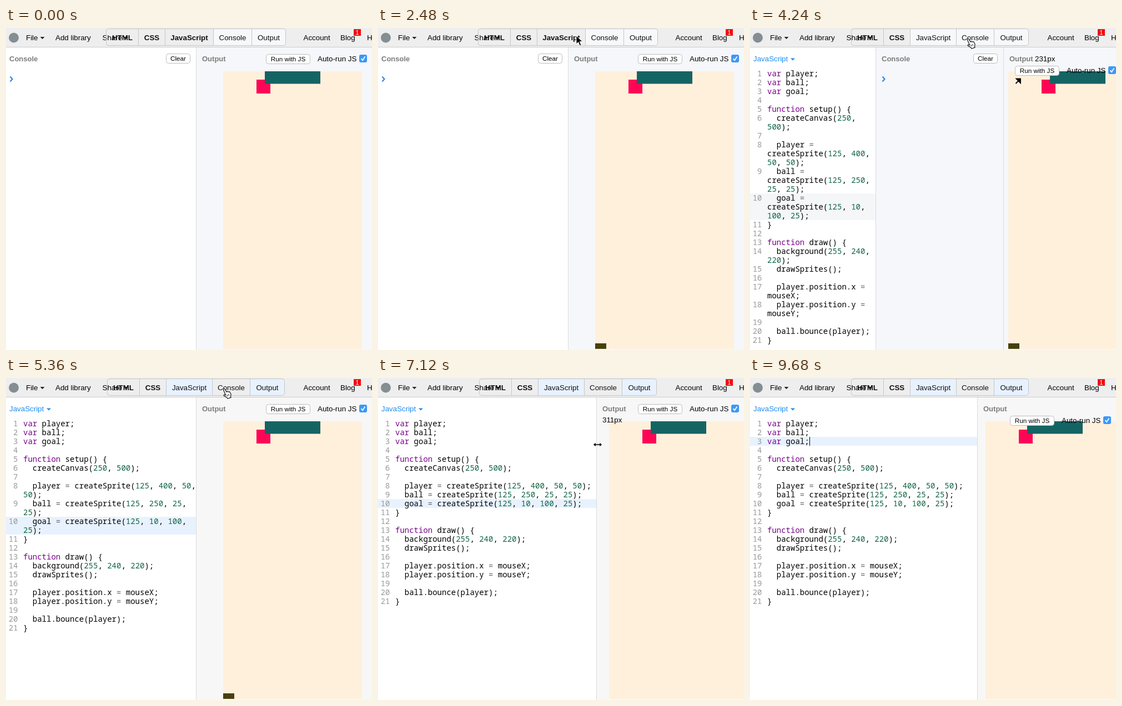
Write an HTML page that moves like this. It is 659x580 px and loops after 9.92 s.

```html
<!DOCTYPE html>
<html lang="en">
<head>
<meta charset="utf-8">
<title>Resizable code panels</title>
<style>
  html, body { margin: 0; width: 100%; height: 100%; overflow: hidden; background: #fff; }
  #stage { position: relative; width: 659px; height: 580px; overflow: hidden; background: #fff; }
  #ui { position: absolute; left: 0; top: 0; font: 13.33px "Liberation Sans", Arial, sans-serif; white-space: pre; }
  #code { position: absolute; left: 0; top: 74px; font: 14px/16px "Noto Sans Mono", monospace; color: #000; }
  #code div { position: relative; box-sizing: border-box; padding-left: 31px; min-height: 16px; white-space: pre-wrap; }
  #code b { position: absolute; left: 0; width: 21.5px; text-align: right; font-weight: 400; color: #999; }
  #code .kw { color: #708; }
  #code .num { color: #164; }
  #code .op { color: #666; }
  #code i { position: absolute; width: 1px; height: 16px; background: #000; }
</style>
</head>
<body>
<div id="stage">
  <div id="code"></div>
  <svg id="ui" width="659" height="580" viewBox="0 0 659 580"></svg>
</div>
<script>
const LOOP = 9920, STEP = 80, WINDOW = 687;
const ui = document.getElementById('ui');
const code = document.getElementById('code');

const source = `var player;
var ball;
var goal;

function setup() {
  createCanvas(250, 500);

  player = createSprite(125, 400, 50, 50);
  ball = createSprite(125, 250, 25, 25);
  goal = createSprite(125, 10, 100, 25);
}

function draw() {
  background(255, 240, 220);
  drawSprites();

  player.position.x = mouseX;
  player.position.y = mouseY;

  ball.bounce(player);
}`;

const paint = line => line.replace(/\b(var|function)\b|\b(\d+)\b|(=)/g, (m, kw, num) =>
  `<span class="${kw ? 'kw' : num ? 'num' : 'op'}">${m}</span>`);

code.innerHTML = source.split('\n').map((line, i) =>
  `<div><b>${i + 1}</b>${paint(line)}</div>`).join('');
const caret = document.createElement('i');

// Tracks: [time, value...], linear between keys
const pointer = [
  [240, 386, 600], [400, 345, 540], [560, 318, 400], [720, 330, 230], [880, 360, 110],
  [960, 364, 84], [1440, 364, 84], [1600, 368, 16], [1760, 368, 16], [1920, 362, 15],
  [2240, 362, 15], [2480, 357, 14], [3600, 357, 14], [3840, 395, 19], [5360, 395, 19],
  [5520, 392, 50], [5680, 372, 90], [5840, 350, 116], [6080, 350, 116], [6160, 344, 120],
  [7920, 344, 120], [8320, 224, 118], [9360, 224, 118], [9600, 236, 560]
];
const divider = [
  [6640, 342], [6720, 344], [6880, 352], [7040, 376], [7120, 393],
  [7280, 402], [7440, 405], [7760, 405], [7920, 409]
];

function at(track, t) {
  const n = track.findIndex(k => k[0] > t);
  if (n < 0) return track[track.length - 1].slice(1);
  if (n === 0) return track[0].slice(1);
  const a = track[n - 1], b = track[n], p = (t - a[0]) / (b[0] - a[0]);
  return a.slice(1).map((v, i) => v + (b[i + 1] - v) * p);
}

const text = (x, y, s, attrs = '') => `<text x="${x}" y="${y}" ${attrs}>${s}</text>`;
const rect = (x, y, w, h, fill, attrs = '') =>
  `<rect x="${x}" y="${y}" width="${w}" height="${h}" fill="${fill}" ${attrs}/>`;
const path = (d, attrs) => `<path d="${d}" ${attrs}/>`;
const move = (x, y, s) => `<g transform="translate(${x} ${y})">${s}</g>`;
const drop = (x, y, fill = '#222') => path(`M${x} ${y}h8l-4 4z`, `fill="${fill}"`);
const heading = (x, s) => text(x, 60, s, 'font-size="13" font-weight="700" fill="#7d7d7d"');
const vline = x => rect(x, 35, 1, 545, '#dcdcdc');
const button = (x, y, w, s) =>
  rect(x + .5, y + .5, w - 1, 17, '#fff', 'rx="4" stroke="#bdbdbd"') +
  text(x + w / 2, y + 13, s, 'font-size="11.7" text-anchor="middle"');

function header(s) {
  const names = ['HTML', 'CSS', 'JavaScript', 'Console', 'Output'];
  const e = s.editor ? [182.5, 240.5, 288.5, 371.5, 439.5, 501.5] : [180.5, 238.5, 286.5, 373.5, 442.5, 503.5];
  const fill = s.focused ? '#e8f2ff' : '#f6f8fa';
  const tabs = names.map((name, i) => {
    const on = s.open.includes(i), w = e[i + 1] - e[i];
    const bg = !on ? '' : i < 4 ? rect(e[i], 1.5, w, 30, fill)
      : path(`M${e[4]} 1.5H${e[5] - 4}q4 0 4 4v22q0 4-4 4H${e[4]}z`, `fill="${fill}"`);
    const weight = i < 3 && !on ? 'font-weight="700"' : '';
    return bg + (i ? path(`M${e[i]} 1.5v30`, 'stroke="#c6c6c6"') : '') +
      text(e[i] + w / 2, 22, name, `text-anchor="middle" fill="#111" ${weight}`);
  }).join('');
  return rect(0, 0, 659, 35, '#eee') + rect(0, 34, 659, 1, '#ccc') +
    '<circle cx="14" cy="17.5" r="9" fill="#858e92"/>' +
    text(36, 22, 'File') + drop(61.5, 16) + text(89, 22, 'Add library') +
    text(173.5, 22, 'Share') + drop(212, 16) + tabs +
    rect(e[0], 1.5, e[5] - e[0], 30, 'none', 'rx="4" stroke="#c6c6c6"') +
    text(535.5, 22, 'Account') + text(602, 22, 'Blog') + text(650, 22, 'Help') +
    rect(626, 2, 13, 12, '#f20d0d') +
    text(632.5, 12, '1', 'font-size="10.5" fill="#fff" text-anchor="middle"');
}

function consolePanel(x, right) {
  return (x ? rect(x, 35, right - x, 545, '#f5f7fa') + vline(x) : '') +
    heading(x ? x + 11 : 6, 'Console') + button(right - 54, 46, 44, 'Clear') +
    path(`M${x ? x + 238 - x - 226 + .5 : 7.5} 87.5l4 4.5-4 4.5`, 'fill="none" stroke="#2f87ea" stroke-width="2.2"');
}

function game(x, s) {
  const player = s.player ? rect(s.player[0] - 25, s.player[1] - 25, 50, 50, '#48400c') : '';
  return `<svg x="${x}" y="78" width="250" height="500">` +
    rect(0, 0, 250, 500, '#fff0dc', 'rx="2"') + player +
    rect(60, 15, 25, 25, '#ff0556') + rect(75, -2.5, 100, 25, '#156464') + '</svg>';
}

function outputPanel(s) {
  const x = s.x, title = x + 11;
  const low = x >= 400, dx = x > 440 ? 9 : 0, dy = low ? 21 : 0;
  const below = x > 375 && !low;
  const label = s.label ? text(below ? title : title + 46, below ? 80 : 60, s.label + 'px') : '';
  const edge = s.dashed ? path(`M${x + .5} 35V580`, 'stroke="#3b93ee" stroke-dasharray="3 3"') : vline(x);
  const openIcon = x > 440
    ? path('M478.5 100l6-6M479.5 91.5h7.5v7.5z', 'fill="#000" stroke="#000" stroke-width="1.8"') : '';
  return rect(x, 35, 659 - x, 545, s.focused ? '#f7f7f7' : '#f5f7fa') + edge +
    game(s.canvas, s) + heading(title, 'Output') + label + openIcon +
    move(dx, dy, button(468, 47, 80, 'Run with JS') + text(561, 60, 'Auto-run JS') +
      rect(636, 48, 14, 14, '#3b98f8', 'rx="3"') +
      path('M639.5 55.2l2.6 3 4.4-6.6', 'fill="none" stroke="#fff" stroke-width="1.8"'));
}

const cursors = {
  arrow: path('M0 0v15l3.6-3.4 2.7 6.2 2.6-1.1-2.7-6.1h5z', 'fill="#000" stroke="#fff"'),
  hand: path('M-4 1q1-2 3 0l3 5 1-1 2 1 2-.5 1.5 1.5 1.5 3-.5 4 .5 2-6 2-1.5-2-5-3q-1-2 1-2l2 1z',
    'fill="#fff" stroke="#111" stroke-width="1.2"') + path('M3 11l1 3m1.5-4l1 3', 'stroke="#111"'),
  resize: path('M-8 0l4.5-4v2.8h7v-2.8l4.5 4-4.5 4v-2.8h-7v2.8z', 'fill="#000" stroke="#fff" stroke-width=".8"'),
  beam: path('M-3.5-7q3 0 3.5 2 .5-2 3.5-2M0-5v11M-3.5 8q3 0 3.5-2 .5 2 3.5 2M-2 3h4',
    'fill="none" stroke="#444" stroke-width="1.3"')
};

function pointerAt(t, split) {
  if (t < 240 || t >= 9680) return null;
  let [x, y] = at(pointer, t);
  if (t >= 6640 && t < 7920) x = split + 2.5;
  if (t >= 7920 && t < 8320) x = 411 + (224 - 411) * (t - 7920) / 400;
  const kind = t < 3840 ? 'arrow' : t < 5440 ? 'hand' : t < 5840 ? 'arrow' : t < 8000 ? 'resize' : 'beam';
  return { x, y, kind };
}

function stateAt(t) {
  const editor = t >= 3360, narrow = editor && t < 4400;
  const x = narrow ? 456 : Math.round(at(divider, t)[0]);
  const canvas = Math.max(Math.round(x / 2 + 219.7), narrow ? x + 9 : 0);
  const mouse = pointerAt(t, x);
  let player = null;
  if (t >= 240 && t < 5520) player = [-5, 515];
  else if (t >= 5520 && t < 5840) player = [mouse.x - canvas, mouse.y - 78];
  let label = 0;
  if (narrow) label = 231;
  else if (t >= 4400 && t < 4800) label = WINDOW - x;
  else if (t >= 6720 && t < 8400) label = WINDOW - Math.round(at(divider, t - STEP)[0]);
  return {
    editor, narrow, x, canvas, mouse, player, label,
    focused: t >= 4400,
    open: !editor ? [3, 4] : narrow ? [2, 3, 4] : [2, 4],
    dashed: t >= 6160 && t < 6640,
    line: t < 8960 ? 9 : 2,
    caret: [[4800, 5360], [6320, 6880], [8960, 9360], [9600, LOOP]].some(([a, b]) => t >= a && t < b)
  };
}

function render(t) {
  const s = stateAt(t);
  const width = s.narrow ? 226 : s.x;
  code.style.display = s.editor ? '' : 'none';
  code.style.width = width + 'px';
  [...code.children].forEach((row, i) => {
    row.style.background = i === s.line ? (s.focused ? '#e8f2ff' : '#f4f6f8') : '';
  });
  if (s.caret) code.children[s.line].append(caret); else caret.remove();

  const left = s.editor
    ? text(6, 60, 'JavaScript', 'fill="#1c8bf2"') + drop(73, 54.5, '#1c8bf2')
    : consolePanel(0, 342);
  const middle = s.narrow ? consolePanel(226, 456) : '';
  const m = s.mouse;
  ui.innerHTML = left + middle.replace('M12.5 87.5', 'M238.5 87.5') + outputPanel(s) + header(s) +
    (m ? move(m.x, m.y, cursors[m.kind]) : '');
}

let shown = -1;
function tick() {
  const t = Math.floor(performance.now() % LOOP / STEP) * STEP;
  if (t !== shown) render(shown = t);
  requestAnimationFrame(tick);
}
tick();
</script>
</body>
</html>
```
